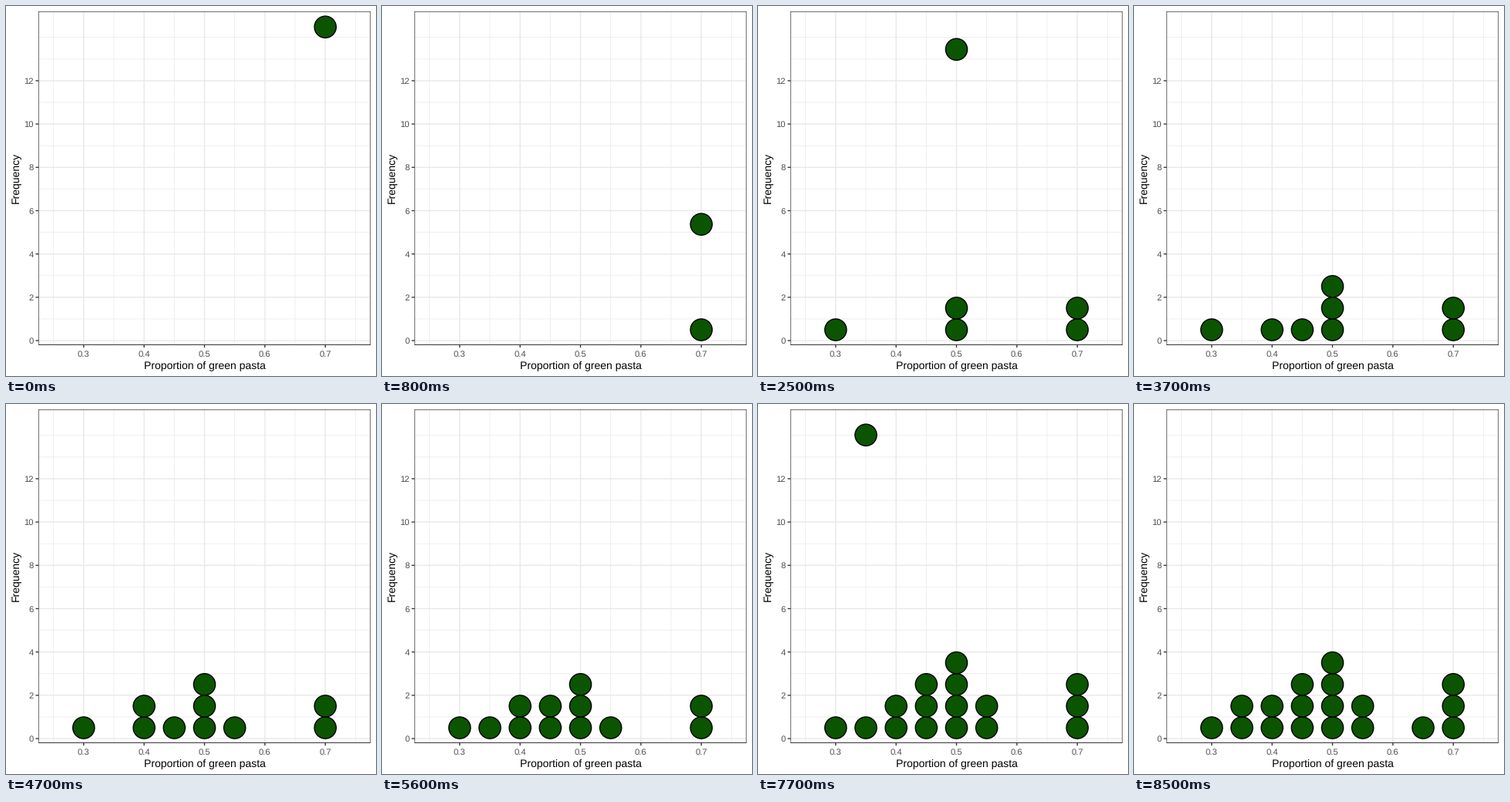
A matplotlib script for the animation above (10000 ms loop, 480 by 480 pixels).

```python
import matplotlib.pyplot as plt
from matplotlib.animation import FuncAnimation
from matplotlib.patches import Circle, Rectangle

SIZE, DPI = 480, 100
LEFT, RIGHT, TOP, BOTTOM = 42.0, 473.0, 7.03, 439.7
X_MIN, X_MAX = 0.225, 0.775
Y_MIN, Y_MAX = -0.2, 15.2
GRID, DARK, TICK_TEXT, GREEN = "#e8e8e8", "#333333", "#4d4d4d", "#0b5500"
THICK, THIN = 1.36, 0.68
TICK = 3.5

DROPS = [0.7, 0.7, 0.5, 0.5, 0.3, 0.5, 0.45, 0.4, 0.55,
         0.4, 0.35, 0.45, 0.45, 0.7, 0.55, 0.5, 0.35, 0.65]
START_Y = 14.5
FALL_STEPS, CYCLE_STEPS = 9, 11
MOVING_FRAMES, FRAMES, INTERVAL = 85, 100, 100
LAST_STEP = len(DROPS) * CYCLE_STEPS - 1

plt.rcParams["font.family"] = "Liberation Sans"
plt.rcParams["text.hinting"] = "none"


def points(pixels):
    return pixels * 72 / DPI


def px(x):
    return LEFT + (x - X_MIN) / (X_MAX - X_MIN) * (RIGHT - LEFT)


def py(y):
    return BOTTOM - (y - Y_MIN) / (Y_MAX - Y_MIN) * (BOTTOM - TOP)


fig = plt.figure(figsize=(SIZE / DPI, SIZE / DPI), dpi=DPI, facecolor="white")
ax = fig.add_axes([0, 0, 1, 1])
ax.set_xlim(0, SIZE)
ax.set_ylim(SIZE, 0)
ax.axis("off")


def line(x0, y0, x1, y1, color, width, z):
    ax.plot([x0, x1], [y0, y1], color=color, lw=points(width), zorder=z,
            solid_capstyle="butt", snap=False)


def label(x, y, text, size, color, ha="center", rotation=0):
    ax.text(x, y, text, fontsize=points(size), color=color, ha=ha,
            va="baseline", rotation=rotation, rotation_mode="anchor")


def draw_axes():
    for i in range(5):
        x = px(0.3 + 0.1 * i)
        minor = px(0.25 + 0.1 * i)
        line(minor, TOP, minor, BOTTOM, GRID, THIN, 1)
        line(x, TOP, x, BOTTOM, GRID, THICK, 2)
        line(x, BOTTOM, x, BOTTOM + TICK, DARK, THICK, 2)
        label(x, 455, f"{0.3 + 0.1 * i:.1f}", 11.2, TICK_TEXT)
    minor = px(0.75)
    line(minor, TOP, minor, BOTTOM, GRID, THIN, 1)

    for value in range(0, 15):
        y = py(value)
        major = value % 2 == 0 and value <= 12
        line(LEFT, y, RIGHT, y, GRID, THICK if major else THIN, 2 if major else 1)
        if major:
            line(LEFT - TICK, y, LEFT, y, DARK, THICK, 2)
            label(35.7, y + 4, str(value), 11.2, TICK_TEXT, ha="right")

    label((LEFT + RIGHT) / 2, 471, "Proportion of green pasta", 14, "black")
    label(17.3, (TOP + BOTTOM) / 2, "Frequency", 14, "black", rotation=90)

    # Only the inner half of the border stroke is visible.
    frame_box = (LEFT, TOP), RIGHT - LEFT, BOTTOM - TOP
    border = Rectangle(*frame_box, fill=False, ec=DARK, lw=points(THICK),
                       zorder=50, snap=False)
    ax.add_patch(border)
    border.set_clip_path(Rectangle(*frame_box, transform=ax.transData))


draw_axes()

rest_heights = [DROPS[:i].count(x) + 0.5 for i, x in enumerate(DROPS)]
balls = [Circle((px(x), py(START_Y)), 14.1, fc=GREEN, ec="black",
                lw=points(1.4), zorder=10 + i, visible=False)
         for i, x in enumerate(DROPS)]
for ball in balls:
    ax.add_patch(ball)


def update(frame):
    progress = min(frame, MOVING_FRAMES) / MOVING_FRAMES
    step = 1 + round(progress * (LAST_STEP - 1))
    for i, (ball, rest) in enumerate(zip(balls, rest_heights)):
        elapsed = step - i * CYCLE_STEPS
        ball.set_visible(elapsed > 0)
        fall = min(max(elapsed / FALL_STEPS, 0), 1) ** 3
        ball.center = px(DROPS[i]), py(START_Y + (rest - START_Y) * fall)
    return balls


anim = FuncAnimation(fig, update, frames=FRAMES, interval=INTERVAL,
                     repeat=True, repeat_delay=0, blit=False)
plt.show()
```
